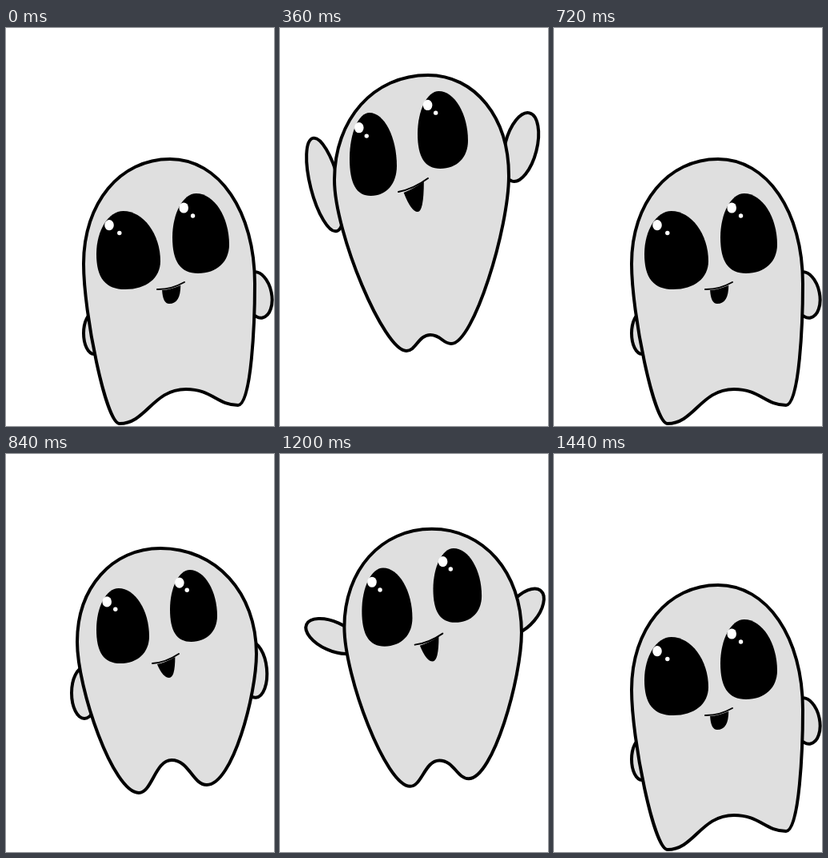
An HTML page with a canvas that plays this animation: 335 by 498 pixels, repeating every 1560 ms.

```html
<!DOCTYPE html>
<html lang="en">
<head>
<meta charset="utf-8">
<title>Bouncing ghost</title>
<style>
html, body { margin: 0; width: 100%; height: 100%; overflow: hidden; background: #fff; }
canvas { display: block; width: 335px; height: 498px; }
</style>
</head>
<body>
<canvas id="stage" width="335" height="498"></canvas>
<script>
const ctx = document.getElementById('stage').getContext('2d');
const STEP = 120, LOOP = 1560;

// Arms: centre x, y, radii, tilt. Eyes: x, y, width, height. Mouth: left tip, right tip, bottom.
const low = {
  top: [205, 164], left: [97, 295], right: [311, 320],
  leftFoot: [142, 495], rightFoot: [290, 472], notch: [225, 452], footWidth: 17,
  leftArm: [110, 382, 13, 26, 0], rightArm: [315, 334, 17, 29, -0.2],
  leftEye: [113, 229, 80, 98], rightEye: [208, 207, 71, 100],
  mouth: [189, 327, 223, 318, 204, 345]
};

const middle = {
  top: [193, 118], left: [89, 235], right: [313, 250],
  leftFoot: [166, 424], rightFoot: [251, 414], notch: [207, 383], footWidth: 32,
  leftArm: [98, 299, 16, 32, 0], rightArm: [309, 270, 17, 35, -0.1],
  leftEye: [113, 168, 66, 94], rightEye: [205, 145, 59, 90],
  mouth: [183, 262, 216, 250, 204, 280]
};

const high = {
  top: [185, 59], left: [68, 190], right: [286, 185],
  leftFoot: [158, 404], rightFoot: [214, 395], notch: [188, 384], footWidth: 28,
  leftArm: [56, 196, 18, 60, -0.25], rightArm: [301, 149, 20, 44, 0.25],
  leftEye: [87, 106, 59, 104], rightEye: [172, 79, 63, 97],
  mouth: [148, 205, 185, 188, 172, 230]
};

const mix = (a, b, k) => Array.isArray(a) ? a.map((v, i) => mix(v, b[i], k)) : a + (b - a) * k;
const blend = (from, to, k) =>
  Object.fromEntries(Object.keys(from).map(key => [key, mix(from[key], to[key], k)]));

const rising = {
  ...blend(middle, high, 0.41),
  leftArm: [66, 228, 18, 36, -1.15],
  rightArm: [304, 197, 18, 34, 0.7]
};

const cycle = [low, middle, rising, high, rising, middle];

// Rounded corner between a flat tangent and an upright one.
function corner([ax, ay], [bx, by], flatFirst, bulge) {
  const dx = (bx - ax) * bulge, dy = (by - ay) * bulge;
  if (flatFirst) ctx.bezierCurveTo(ax + dx, ay, bx, by - dy, bx, by);
  else ctx.bezierCurveTo(ax, ay + dy, bx - dx, by, bx, by);
}

// Wave between two points whose tangents are both flat.
function wave([ax, ay], [bx, by], startPull, endPull) {
  const dx = bx - ax;
  ctx.bezierCurveTo(ax + dx * startPull, ay, bx - dx * endPull, by, bx, by);
}

function fillShape(color, lineWidth = 0) {
  ctx.fillStyle = color;
  ctx.fill();
  if (!lineWidth) return;
  ctx.lineWidth = lineWidth;
  ctx.stroke();
}

function ellipse(x, y, rx, ry, tilt = 0) {
  ctx.beginPath();
  ctx.ellipse(x, y, rx, ry, tilt, 0, Math.PI * 2);
}

function drawBody({ top, left, right, leftFoot, rightFoot, notch, footWidth }) {
  const [lx, ly] = left, [rx, ry] = right;
  const [lfx, lfy] = leftFoot, [rfx, rfy] = rightFoot;
  ctx.beginPath();
  ctx.moveTo(...top);
  corner(top, right, true, 0.58);
  ctx.bezierCurveTo(rx, mix(ry, rfy, 0.31), rfx + footWidth, rfy, rfx, rfy);
  wave(rightFoot, notch, 0.4, 0.5);
  wave(notch, leftFoot, 0.5, 0.4);
  ctx.bezierCurveTo(lfx - footWidth, lfy, lx, mix(ly, lfy, 0.31), lx, ly);
  corner(left, top, false, 0.58);
  ctx.closePath();
  fillShape('#dfdfdf', 4);
}

function drawArm(arm) {
  ellipse(...arm);
  fillShape('#dfdfdf', 4);
}

function drawEye([x, y, w, h]) {
  const at = (u, v) => [x + w * u, y + h * v];
  const top = at(0.42, 0), right = at(1, 0.64), bottom = at(0.45, 1), left = at(0, 0.55);
  ctx.beginPath();
  ctx.moveTo(...top);
  corner(top, right, true, 0.54);
  corner(right, bottom, false, 0.6);
  corner(bottom, left, true, 0.68);
  corner(left, top, false, 0.55);
  fillShape('#000');
  ellipse(...at(0.2, 0.18), 5.8, 6.6);
  fillShape('#fff');
  ellipse(...at(0.36, 0.28), 2.7, 2.7);
  fillShape('#fff');
}

function drawMouth([lx, ly, rx, ry, bx, by]) {
  const dip = [(lx + rx) / 2, (ly + ry) / 2 + 5];
  const innerLeft = mix(lx, rx, 0.18), innerRight = mix(lx, rx, 0.86);
  ctx.beginPath();
  ctx.moveTo(lx, ly);
  ctx.quadraticCurveTo(...dip, rx, ry);
  ctx.lineWidth = 2;
  ctx.stroke();
  ctx.beginPath();
  ctx.moveTo(innerLeft, ly + 1);
  ctx.quadraticCurveTo(...dip, innerRight, ry + 4);
  ctx.quadraticCurveTo(innerRight, by, bx, by);
  ctx.quadraticCurveTo(bx - 8, by, innerLeft, ly + 1);
  fillShape('#000');
}

function drawGhost(pose) {
  ctx.fillStyle = '#fff';
  ctx.fillRect(0, 0, 335, 498);
  ctx.strokeStyle = '#000';
  ctx.lineJoin = ctx.lineCap = 'round';
  drawArm(pose.leftArm);
  drawArm(pose.rightArm);
  drawBody(pose);
  drawEye(pose.leftEye);
  drawEye(pose.rightEye);
  drawMouth(pose.mouth);
}

function tick() {
  const step = Math.floor(performance.now() % LOOP / STEP);
  drawGhost(cycle[step % cycle.length]);
  requestAnimationFrame(tick);
}
tick();
</script>
</body>
</html>
```
